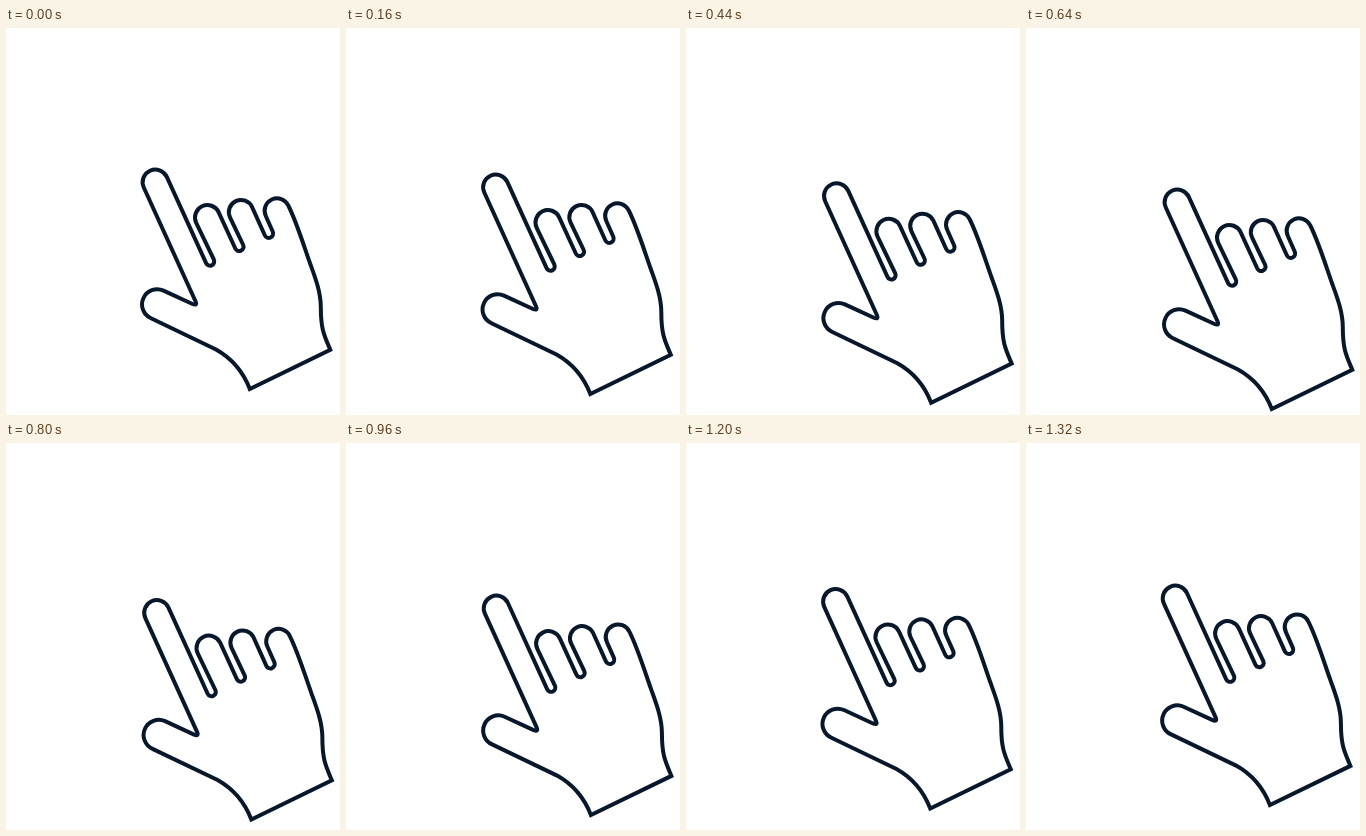
An HTML page that plays this animation: 334 by 387 pixels, repeating every 1.36 s.

```html
<!DOCTYPE html>
<html lang="en">
<head>
<meta charset="utf-8">
<title>Tapping hand</title>
<style>
  html, body { margin: 0; height: 100%; overflow: hidden; background: #fff; }
  svg { display: block; width: 334px; height: 387px; }
  path { fill: #fff; stroke: #08182c; stroke-width: 4; stroke-linejoin: miter; }
</style>
</head>
<body>
<svg viewBox="0 0 334 387">
  <!-- Fingertips and gaps are semicircles: small radii scale up to fit -->
  <path id="hand" d="
    M243.8 361
    C238 346 227 331 210 321.5
    L145 290.3
    A15 15 0 0 1 157.5 262.6
    L186.5 276
    Q191.5 278 189.6 273.5
    L137.8 159.5
    A12 12 0 0 1 160.8 148.9
    L200.1 235.2
    A4 4 0 0 0 207.9 231.7
    L190.2 194.8
    A12 12 0 0 1 212.6 184.1
    L229.3 220.5
    A4 4 0 0 0 237.2 217
    L224 189.3
    A12 12 0 0 1 246 178.9
    L258.8 207.3
    A4 4 0 0 0 266.8 203.7
    L259.8 188
    A12 12 0 0 1 282.3 177.5
    C291 195 297.5 217 304.3 236
    C309 249 314.8 264 314.8 279
    C314.8 301 318 307 324.3 321.8
    Z"/>
</svg>
<script>
  const LOOP = 1360, STEP = 40, PRESS = 640;
  const hand = document.getElementById('hand');

  function draw(now) {
    const t = Math.floor(now % LOOP / STEP) * STEP;
    const k = t < PRESS ? t / PRESS : (LOOP - t) / (LOOP - PRESS);
    hand.setAttribute('transform', `translate(${2 * k} ${20 * k})`);
  }

  const start = performance.now();
  function tick() {
    draw(performance.now() - start);
    requestAnimationFrame(tick);
  }
  tick();
</script>
</body>
</html>
```
